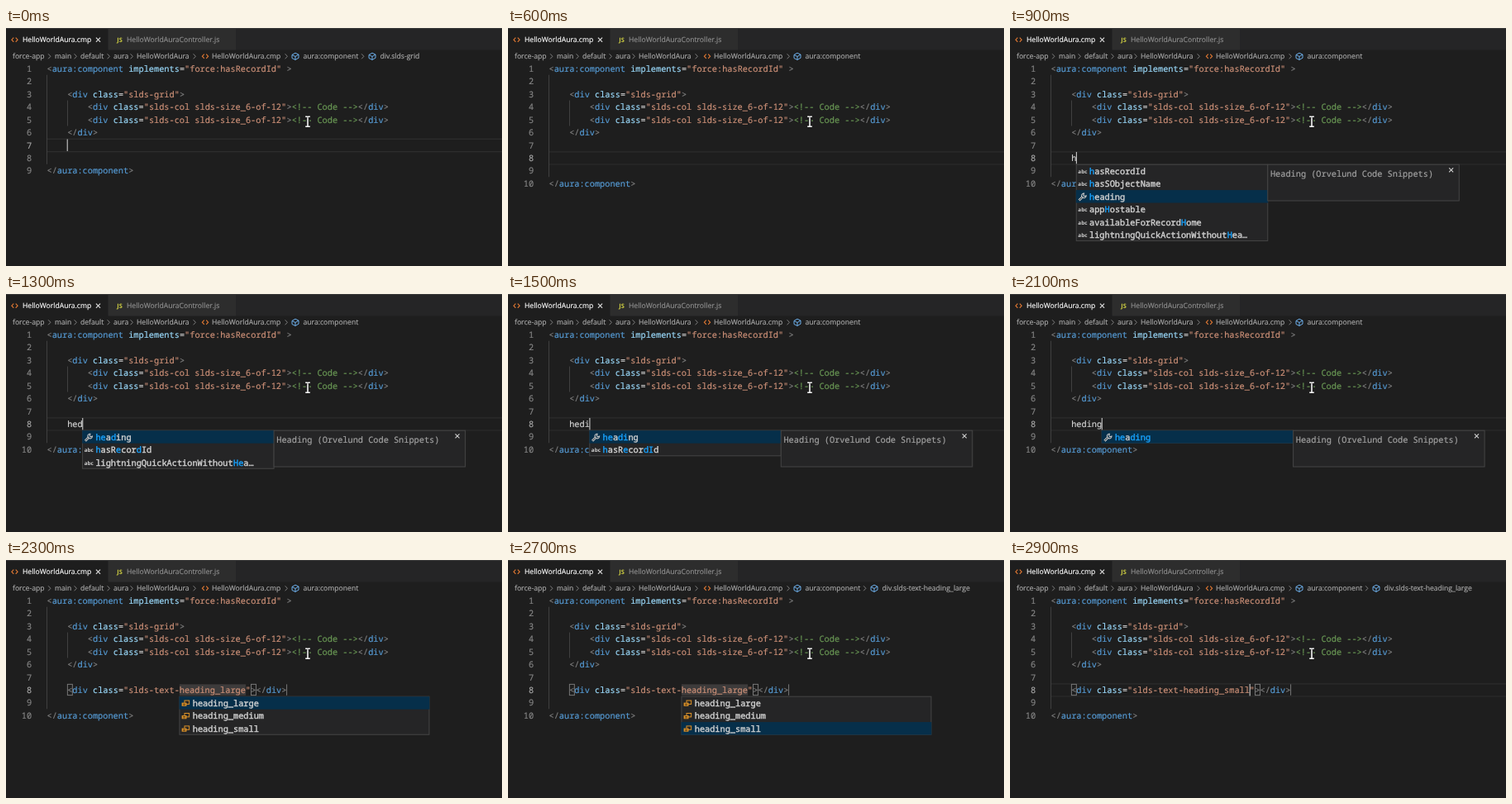
Write an HTML page that moves like this. It is 600 px wide and 288 px high and loops after 3 s.

```html
<!DOCTYPE html>
<html lang="en">
<head>
<meta charset="utf-8">
<title>Code editor</title>
<style>
  html, body { margin: 0; width: 100%; height: 100%; overflow: hidden; background: #1e1e1e; }
  svg { display: block; width: 600px; height: 288px; }
  text { white-space: pre; text-rendering: geometricPrecision; }
  .ui { font: 8.62px "Open Sans", "Noto Sans", sans-serif; stroke-width: .16; }
  .code { font: 10.28px "Noto Sans Mono", "DejaVu Sans Mono", monospace; stroke-width: .16; }
  .list .code { stroke-width: .38; }
  .tiny { font: bold 6.3px "Open Sans", sans-serif; stroke-width: 0; }
  .js { font: bold 7.4px "Open Sans", sans-serif; stroke-width: 0; }
</style>
</head>
<body>
<svg id="stage" viewBox="0 0 600 288" xmlns="http://www.w3.org/2000/svg"></svg>
<script>
const LOOP = 3000, STEP = 100;
const CW = 6.17, LH = 15.44, LEFT = 49.5, TOP = 41.3, BASE = 11.6;
const INK = {
  p: '#808080', t: '#569cd6', a: '#9cdcfe', s: '#ce9178', c: '#6a9955', w: '#d4d4d4', hit: '#18a3ff'
};
const colX = c => LEFT + c * CW;
const lineY = n => TOP + (n - 1) * LH;
const esc = s => s.replace(/&/g, '&amp;').replace(/</g, '&lt;').replace(/>/g, '&gt;');

const text = (x, y, s, fill, cls = 'code', extra = '') =>
  `<text class="${cls}" x="${x.toFixed(2)}" y="${y.toFixed(2)}" fill="${fill}" stroke="${fill}" ${extra}>${esc(s)}</text>`;
const rect = (x, y, w, h, fill, stroke = 'none') =>
  `<rect x="${x}" y="${y}" width="${w}" height="${h}" fill="${fill}" stroke="${stroke}"/>`;
const path = (d, stroke, w = 1, fill = 'none') =>
  `<path d="${d}" stroke="${stroke}" stroke-width="${w}" fill="${fill}"/>`;

// Draws [ink, text] pairs one after another on the character grid.
function run(x, y, parts) {
  return parts.map(([ink, s]) => {
    const out = text(x, y, s, INK[ink]);
    x += s.length * CW;
    return out;
  }).join('');
}
const code = (n, col, parts) => run(colX(col), lineY(n) + BASE, parts);

const close = (x, y, c, r = 2.6) => path(`M${x - r} ${y - r}l${2 * r} ${2 * r}m0 ${-2 * r}l${-2 * r} ${2 * r}`, c, 1.1);
const chevron = x => path(`M${x - 1.4} 31.3l2.8 3l-2.8 3`, '#8a8a8a', .9);
const angles = (x, y) => path(`M${x - 1.2} ${y - 2.6}l-2.4 2.6l2.4 2.6M${x + 1.2} ${y - 2.6}l2.4 2.6l-2.4 2.6`, '#e37933', 1.1);
const cube = x => path(`M${x - 4} 32.5l4 -2.3l4 2v4l-4 2.3l-4 -2zl4 2l4 -2.3M${x} 34.5v4`, '#75beff', .9);

const OPEN = [['p', '<'], ['t', 'div'], ['a', ' class'], ['w', '=']];
const CLOSE = [['p', '</'], ['t', 'div'], ['p', '>']];
const COLUMN = [...OPEN, ['s', '"slds-col slds-size_6-of-12"'], ['p', '>'], ['c', '<!-- Code -->'], ...CLOSE];

function header(crumb) {
  let s = rect(0, 0, 600, 26.5, '#252526') + rect(0, 0, 123, 27, '#1e1e1e') + rect(124, 0, 154, 26.5, '#2d2d2d');
  s += rect(0, 0, 600, 1, '#3a3a3a');
  s += angles(10.5, 14.2) + text(20, 17.4, 'HelloWorldAura.cmp', '#ffffff', 'ui') + close(111.5, 14.2, '#e0e0e0');
  s += text(134.3, 17.2, 'JS', '#cbcb41', 'js') + text(146, 17.4, 'HelloWorldAuraController.js', '#8f8f8f', 'ui');
  const crumbs = [[8, 'force-app'], [59, 'main'], [90, 'default'], [130, 'aura'], [158, 'HelloWorldAura'],
    [249, 'HelloWorldAura.cmp'], [359.5, 'aura:component']];
  if (crumb) crumbs.push([452.5, crumb]);
  s += crumbs.map(([x, name]) => text(x, 37.3, name, '#a9a9a9', 'ui')).join('');
  s += [52.5, 84, 124, 152, 228, 339].map(chevron).join('') + angles(241, 34.2) + cube(350);
  return crumb ? s + chevron(431.5) + cube(443) : s;
}

function lines(count, active, lit) {
  let s = lit ? path(`M49 ${lineY(active) + .4}H600M49 ${lineY(active + 1) + .2}H600`, '#2d2d2d', 1.2) : '';
  s += path(`M49.5 ${lineY(2)}V${lineY(count)}M74.5 ${lineY(4)}V${lineY(6)}`, '#404040');
  for (let n = 1; n <= count; n++)
    s += text(31.2, lineY(n) + BASE, String(n), n === active ? '#a8a8a8' : '#858585', 'code', 'text-anchor="end"');
  s += code(1, 0, [['p', '<'], ['t', 'aura:component'], ['a', ' implements'], ['w', '='],
    ['s', '"force:hasRecordId"'], ['p', ' >']]);
  s += code(3, 4, [...OPEN, ['s', '"slds-grid"'], ['p', '>']]);
  s += code(4, 8, COLUMN) + code(5, 8, COLUMN) + code(6, 4, CLOSE);
  return s + code(count, 0, [['p', '</'], ['t', 'aura:component'], ['p', '>']]);
}

const caret = (n, col) => rect(colX(col) - .5, lineY(n) + .6, 1.1, LH - 1, '#c8c8c8');

// Splits a label into matched and plain characters for the typed query.
function marked(label, query) {
  let at = label[0] === query[0] ? 0 : label.indexOf(query[0].toUpperCase());
  const hits = new Set();
  for (const q of query) {
    at = label.toLowerCase().indexOf(q, at);
    if (at < 0) break;
    hits.add(at++);
  }
  const parts = [];
  [...label].forEach((ch, i) => {
    const ink = hits.has(i) ? 'hit' : 'w', last = parts[parts.length - 1];
    if (last && last[0] === ink) last[1] += ch;
    else parts.push([ink, ch]);
  });
  return parts;
}

const wrench = (x, y) => path(`M${x - 4} ${y + 4.4}l4.4 -4.4`, '#c5c5c5', 2.8) +
  path(`M${x - 3.8} ${y + 4.2}l4.2 -4.2`, '#1c2c38', 1) +
  path(`M${x + 2} ${y - 4}a2.8 2.8 0 1 0 2.6 2.8l-2.1 .8l-1.2 -1.2z`, '#c5c5c5', 1.1);
const abc = (x, y) => text(x - 5.2, y + 2.5, 'abc', '#d0d0d0', 'tiny');
const choice = (x, y) => rect(x - 1.2, y - 3.2, 5.6, 4.4, '#252526', '#dd9228') +
  rect(x - 4.6, y - .6, 5.8, 4.2, '#dd9228') + path(`M${x - 3.2} ${y + .8}h3m0 1.5h-3M${x + .4} ${y - 1.4}h2.4`, '#3a2c18', .7);

function popup(x, width, items, picked, icon, query) {
  const y = lineY(9) + .4;
  let s = rect(x, y, width, items.length * LH - .3, '#252526', '#454545');
  items.forEach((label, i) => {
    const top = y + i * LH, mid = top + LH / 2;
    if (i === picked) s += rect(x - .4, top, width + .8, LH, '#062f4a');
    s += icon(label)(x + 7.3, mid + .3);
    s += run(x + 15.8, mid + 4, query ? marked(label, query) : [['w', label]]);
  });
  return `<g class="list">${s}</g>`;
}

const NAMES = ['hasRecordId', 'hasSObjectName', 'appHostable', 'availableForRecordHome', 'lightningQuickActionWithoutHea…'];
const HEADING = 'heading';
const SIZES = ['heading_large', 'heading_medium', 'heading_small'];

function suggestions(word) {
  const [rec, obj, ...rest] = NAMES;
  const lists = {
    h: [rec, obj, HEADING, ...rest],
    he: [HEADING, ...NAMES],
    hed: [HEADING, rec, NAMES[4]],
    hedi: [HEADING, rec]
  };
  const items = lists[word] || [HEADING];
  const x = colX(4 + word.length) - .1, right = x + 231.5, y = lineY(9) + .4;
  return popup(x, 231.5, items, items.indexOf(HEADING), l => l === HEADING ? wrench : abc, word) +
    rect(right, y, 231.5, 43.8, '#252526', '#454545') +
    text(right + 3.2, y + 14.4, 'Heading (Orvelund Code Snippets)', '#a4a4a4') +
    close(right + 221.9, y + 6.6, '#d0d0d0', 2.5);
}

function snippet(size, choosing) {
  const y = lineY(8), box = col => rect(colX(col) + .2, y + 1, CW - .2, LH - 2.2, 'none', '#777');
  let s = choosing ? rect(colX(26), y + 1, 13 * CW, LH - 2, '#3d3b3b') : '';
  s += code(8, 4, [...OPEN, ['s', `"slds-text-${size}"`], ['p', '>'], ...CLOSE]);
  return s + box(4) + box(40) + rect(colX(47) - .4, y + 1, 1, LH - 2, '#777');
}

const BEAM = 'M362.2 107.2h1.9l.9 .7l.9 -.7h1.9M365 107.6v11.2M362.2 119.2h1.9l.9 -.7l.9 .7h1.9';
const pointer = path(BEAM, '#1e1e1e', 4) + path(BEAM, '#f4f4f4', 1.6);

const KEYS = [700, 1100, 1300, 1400, 1600, 1800];
const ENTER = 300, ACCEPT = 2300, CHOSEN = 2800;

function draw(t) {
  const split = t >= ENTER, done = t >= ACCEPT, choosing = done && t < CHOSEN;
  const crumb = t < 500 ? 'div.slds-grid' : t >= 2500 ? 'div.slds-text-heading_large' : '';
  const active = split ? 8 : 7;
  let s = rect(0, 0, 600, 288, '#1e1e1e') + header(crumb) + lines(split ? 10 : 9, active, !choosing);
  const word = 'heding'.slice(0, KEYS.filter(k => t >= k).length);
  if (done) {
    s += snippet(choosing ? SIZES[0] : SIZES[2], choosing);
    if (choosing) s += popup(colX(26), 302, SIZES, t < 2500 ? 0 : t < 2600 ? 1 : 2, () => choice);
    else s += caret(8, 39);
  } else {
    s += code(8, 4, [['w', word]]);
    if (t < 600 || word) s += caret(active, 4 + word.length);
    if (t >= 800) s += suggestions(word);
  }
  return s + pointer;
}

const stage = document.getElementById('stage');
let shown = -1;
function tick() {
  const step = Math.floor(performance.now() % LOOP / STEP);
  if (step !== shown) {
    shown = step;
    stage.innerHTML = draw(step * STEP);
  }
  requestAnimationFrame(tick);
}
tick();
</script>
</body>
</html>
```
